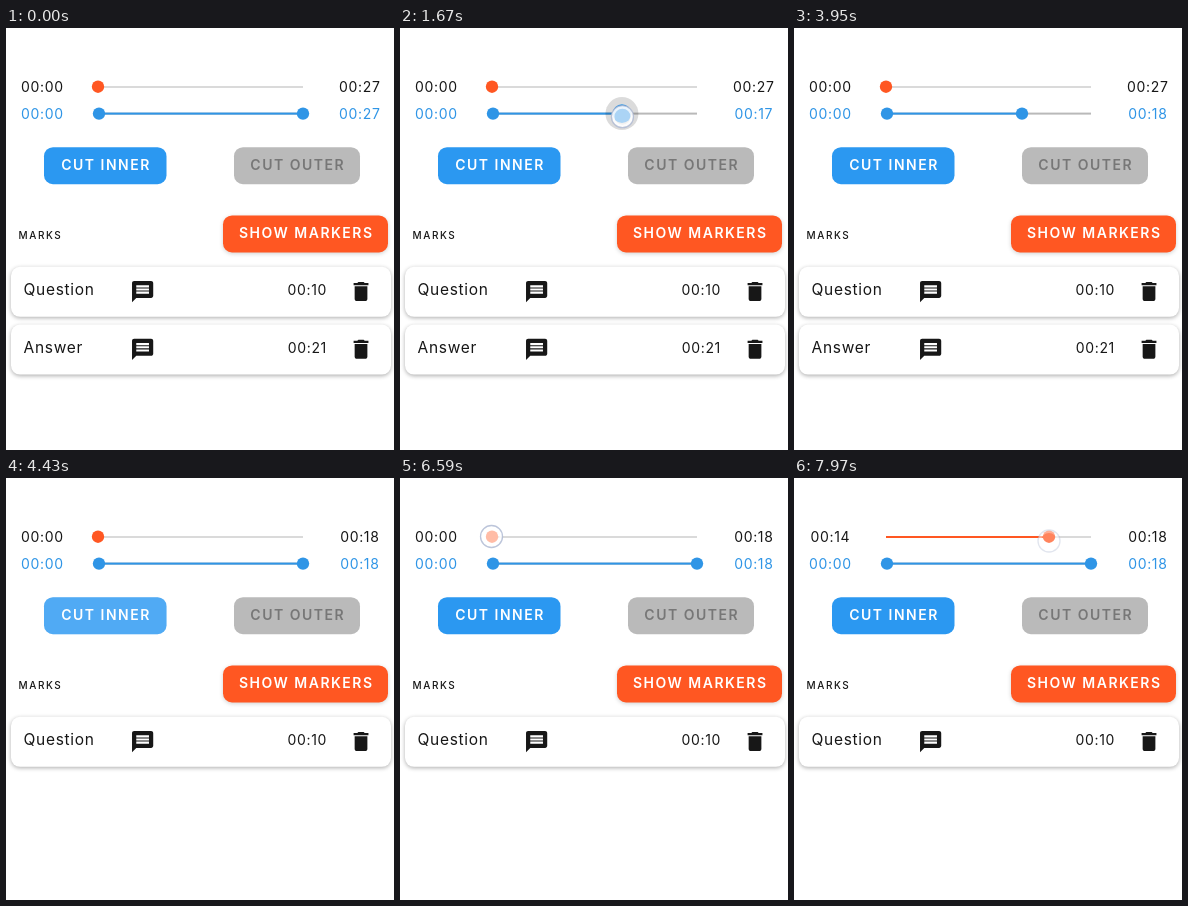
Animation, 388 px wide and 422 px high, one loop 8 s. Source, as an HTML page with a canvas:

```html
<!DOCTYPE html>
<html lang="en">
<head>
<meta charset="utf-8">
<style>
  html, body { margin: 0; width: 100%; height: 100%; overflow: hidden; background: #fff; }
  canvas { display: block; width: 388px; height: 422px; }
</style>
</head>
<body>
<canvas id="stage"></canvas>
<script>
const LOOP = 8000, W = 388, H = 422;
const BLUE = '#2f95e6', ORANGE = '#ff5722', INK = '#171717';
const SEEK_Y = 58.7, CUT_Y = 85.6;
const canvas = document.getElementById('stage');
const ctx = canvas.getContext('2d');
const ratio = window.devicePixelRatio || 1;
canvas.width = W * ratio;
canvas.height = H * ratio;

const messageIcon = new Path2D('M20 2H4C2.9 2 2 2.9 2 4V22L6 18H20C21.1 18 22 17.1 22 16V4C22 2.9 21.1 2 20 2ZM18 14H6V12H18ZM18 11H6V9H18ZM18 8H6V6H18Z');
const trashIcon = new Path2D('M6 19C6 20.1 6.9 21 8 21H16C17.1 21 18 20.1 18 19V7H6ZM19 4H15.5L14.5 3H9.5L8.5 4H5V6H19Z');

const cutDrag = [[500, 297], [650, 297], [1010, 269], [1280, 240], [1800, 216], [2090, 213], [2510, 228]];
const seekDrag = [[6590, 92], [6700, 94], [7370, 248], [7580, 258], [7850, 258], [7940, 255]];

const clamp = v => Math.max(0, Math.min(1, v));
const ramp = (t, from, to) => clamp((t - from) / (to - from));
const pulse = (t, start, full, hold, end) => Math.min(ramp(t, start, full), 1 - ramp(t, hold, end));
const clock = s => '00:' + String(Math.round(s)).padStart(2, '0');

function follow(keys, t) {
  if (t <= keys[0][0]) return keys[0][1];
  for (let i = 1; i < keys.length; i++) {
    const [t0, v0] = keys[i - 1], [t1, v1] = keys[i];
    if (t < t1) return v0 + (v1 - v0) * ramp(t, t0, t1);
  }
  return keys[keys.length - 1][1];
}

function label(str, x, y, size, spacing, color = INK, weight = 400, align = 'left') {
  ctx.font = `${weight} ${size}px Inter, sans-serif`;
  ctx.letterSpacing = spacing + 'px';
  ctx.textAlign = align;
  ctx.fillStyle = color;
  ctx.fillText(str, x + (align === 'center' ? spacing / 2 : 0), y);
}

const time = (str, cx, y, color) => label(str, cx, y, 14, 0.65, color, 400, 'center');

function disc(x, y, r, color) {
  ctx.fillStyle = color;
  ctx.beginPath();
  ctx.arc(x, y, r, 0, Math.PI * 2);
  ctx.fill();
}

function bar(x0, x1, y, color) {
  ctx.fillStyle = color;
  ctx.fillRect(x0, y - 1, x1 - x0, 2);
}

function box(x, y, w, h, r, color, shadow) {
  ctx.save();
  if (shadow) {
    ctx.shadowColor = shadow;
    ctx.shadowBlur = 4 * ratio;
    ctx.shadowOffsetY = 1.3 * ratio;
  }
  ctx.fillStyle = color;
  ctx.beginPath();
  ctx.roundRect(x, y, w, h, r);
  ctx.fill();
  ctx.restore();
}

function button(str, x, y, w, color, ink, shadow) {
  box(x, y, w, 37, 9, color, shadow);
  label(str, x + w / 2, y + 23, 14, 1.5, ink, 600, 'center');
}

function icon(path, x, y) {
  ctx.save();
  ctx.translate(x, y);
  ctx.scale(1.06, 1.06);
  ctx.fillStyle = INK;
  ctx.fill(path);
  ctx.restore();
}

function row(name, at, y) {
  box(5, y, 380, 50, 9, '#fff', 'rgba(0,0,0,.32)');
  label(name, 17.5, y + 28, 15.5, 0.7);
  time(at, 301, y + 28, INK);
  icon(messageIcon, 123.9, y + 12.1);
  icon(trashIcon, 342.3, y + 12);
}

function touch(x, y, alpha) {
  if (alpha <= 0) return;
  ctx.save();
  ctx.globalAlpha = alpha;
  disc(x, y, 11, 'rgba(255,255,255,.6)');
  ctx.lineWidth = 3;
  ctx.strokeStyle = 'rgba(255,255,255,.75)';
  ctx.beginPath();
  ctx.arc(x, y, 9.5, 0, Math.PI * 2);
  ctx.stroke();
  ctx.lineWidth = 1.3;
  ctx.strokeStyle = 'rgba(165,178,205,.75)';
  ctx.beginPath();
  ctx.arc(x, y, 11, 0, Math.PI * 2);
  ctx.stroke();
  ctx.restore();
}

function seekSlider(t, length) {
  const x = follow(seekDrag, t);
  time(clock((x - 92) / 205 * length), 36, 63.7, INK);
  time(clock(length), 353.5, 63.7, INK);
  bar(92, 297, 59, '#dadada');
  bar(92, x, 59, ORANGE);
  disc(x, SEEK_Y, 6.2, ORANGE);
  const dip = 58.5 + 4.5 * ramp(t, 6900, 7500);
  if (t >= 6585) touch(x - 0.5 * (1 - ramp(t, 6700, 7000)), dip, 1 - 0.55 * ramp(t, 7840, 7970));
}

function cutSlider(t, isCut) {
  const x = isCut ? 297 : follow(cutDrag, t);
  const press = pulse(t, 500, 590, 2780, 3110);
  time('00:00', 36, 91, BLUE);
  time(clock(isCut ? 18 : (x - 93) / 204 * 27), 353.5, 91, BLUE);
  bar(93, 297, CUT_Y, '#b9b9b9');
  bar(93, x, CUT_Y, BLUE);
  disc(93, CUT_Y, 6.2, BLUE);
  const ripple = pulse(t, 500, 590, 620, 800);
  if (ripple > 0) disc(297, 84, 58 * ramp(t, 480, 620), `rgba(0,0,0,${0.07 * ripple})`);
  disc(x, CUT_Y, 16.5, `rgba(0,0,0,${0.14 * press})`);
  disc(x, CUT_Y, 6.2 + 3.2 * press, BLUE);
  touch(x + 0.5, 87 + 3.3 * ramp(t, 1010, 2300), press);
}

function cutButton(t) {
  button('CUT INNER', 38, 119.2, 122.5, '#2b98f1', '#fff');
  const press = pulse(t, 4100, 4200, 4340, 4640);
  if (press <= 0) return;
  ctx.save();
  ctx.beginPath();
  ctx.roundRect(38, 119.2, 122.5, 37, 9);
  ctx.clip();
  disc(99, 138, 75 * ramp(t, 4080, 4350), `rgba(255,255,255,${0.25 * press})`);
  ctx.restore();
  touch(99, 138, pulse(t, 4100, 4160, 4300, 4420));
}

function draw(t) {
  const isCut = t >= 4400;
  ctx.setTransform(ratio, 0, 0, ratio, 0, 0);
  ctx.fillStyle = '#fff';
  ctx.fillRect(0, 0, W, H);
  button('CUT OUTER', 228, 119.2, 126, '#bababa', '#777');
  cutButton(t);
  label('MARKS', 12.5, 210.8, 10, 1.6, INK, 500);
  button('SHOW MARKERS', 217, 187.4, 165, ORANGE, '#fff', 'rgba(0,0,0,.18)');
  row('Question', '00:10', 238.8);
  if (!isCut) row('Answer', '00:21', 296.6);
  seekSlider(t, isCut ? 18 : 27);
  cutSlider(t, isCut);
}

const start = performance.now();
function tick() {
  draw((performance.now() - start) % LOOP);
  requestAnimationFrame(tick);
}
tick();
</script>
</body>
</html>
```
